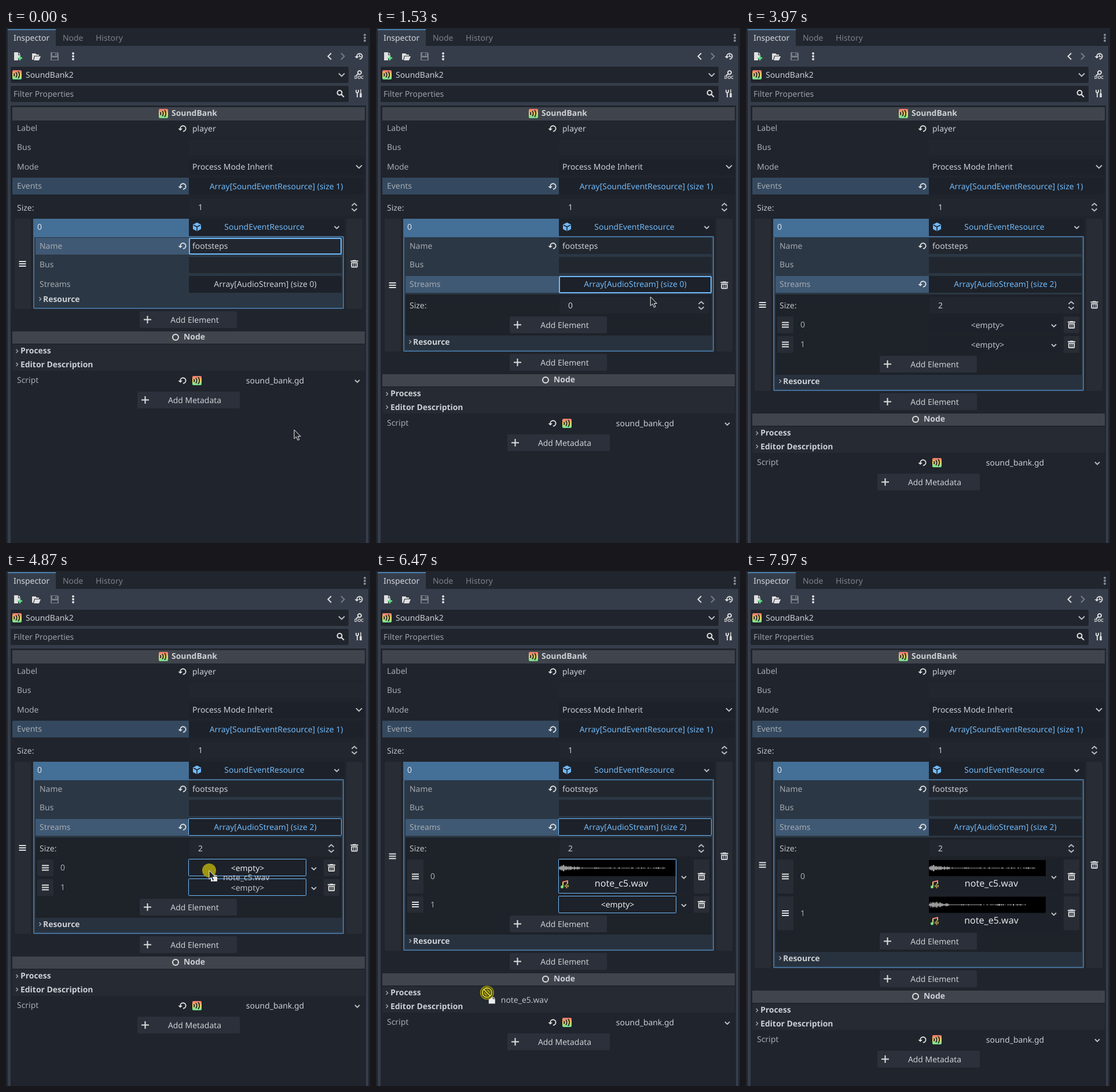
These frames come from a looping animation (629 px wide and 891 px high, 9.02 s). An HTML page:

```html
<!DOCTYPE html>
<html lang="en">
<head>
<meta charset="utf-8">
<title>Inspector</title>
<style>
html, body { margin: 0; width: 100%; height: 100%; overflow: hidden; background: #21262e; }
svg { display: block; width: 629px; height: 891px; font: 13.93px "Noto Sans", sans-serif; }
text { white-space: pre; text-rendering: geometricPrecision; }
</style>
</head>
<body>
<svg viewBox="0 0 629 891">
  <defs>
    <linearGradient id="audio" x1="0" y1="0" x2="0" y2="1">
      <stop offset="0.1" stop-color="#f4806a"/>
      <stop offset="0.5" stop-color="#efd962"/>
      <stop offset="0.9" stop-color="#79e08c"/>
    </linearGradient>
  </defs>
  <g id="frame"></g>
  <g id="body"></g>
  <g id="pointer">
    <g id="ghost">
      <path d="M3 7H10V11H14V19H3Z" fill="#eceded"/>
      <path d="M11 7 14 10H11Z" fill="#eceded"/>
      <text id="file" x="24" y="17" fill="#d8dade" opacity=".85"></text>
    </g>
    <circle id="halo" r="12" fill="#9d9512"/>
    <path id="arrow" d="M0 0V15.5L3.6 12.2 6.2 18.2 8.8 17 6.3 11.4H11Z" fill="#20242b" stroke="#f4f4f4" stroke-linejoin="round"/>
    <g id="deny" fill="none">
      <path d="M-5.5-5.5 5.5 5.5M8 0A8 8 0 1 1 8-.1" stroke="#26260c" stroke-width="4.4"/>
      <path d="M-5.5-5.5 5.5 5.5M8 0A8 8 0 1 1 8-.1" stroke="#dfd62a" stroke-width="2"/>
    </g>
  </g>
</svg>
<script>
const LOOP = 9020;
const BG = '#20242c', FIELD = '#1d2129', EDIT = '#22272f', BASE = '#363d4a', BUTTON = '#2b303a';
const SUB = '#2b3744', PICK = '#3f5873', EDGE = '#446f97', BLUE = '#70bafa';
const LABEL = '#a6abb2', VALUE = '#cdd0d5', WHITE = '#e0e0e0';
const $ = id => document.getElementById(id);

const rect = (x, y, w, h, fill, rx = 0) =>
  `<rect x="${x}" y="${y}" width="${w}" height="${h}" fill="${fill}" rx="${rx}"/>`;
const outline = (x, y, w, h, width, color = BLUE) =>
  `<rect x="${x}" y="${y}" width="${w}" height="${h}" fill="none" stroke="${color}" stroke-width="${width}" rx="1"/>`;
const text = (x, y, s, fill = LABEL, extra = '') =>
  `<text x="${x}" y="${y + 5}" fill="${fill}" ${extra}>${s}</text>`;
const mid = (x, y, s, fill = VALUE, extra = '') => text(x, y, s, fill, 'text-anchor="middle" ' + extra);
const bold = (x, y, s, fill = VALUE) => text(x, y, s, fill, 'font-weight="700"');
const line = (x, y, d, width = 2, color = WHITE) =>
  `<path transform="translate(${x} ${y})" d="${d}" fill="none" stroke="${color}" stroke-width="${width}"/>`;
const shape = (x, y, d, color = WHITE) =>
  `<path transform="translate(${x} ${y})" d="${d}" fill="${color}" fill-rule="evenodd"/>`;
// Icon drawn on a 16-unit grid, centred on x, y.
const glyph = (x, y, d) =>
  `<path transform="translate(${x} ${y}) scale(.94) translate(-8 -8)" d="${d}" fill="${WHITE}" fill-rule="evenodd"/>`;

const RESET = 'M9 2A6 6 0 0 0 3 8H0L4 12 8 8H5A4 4 0 1 1 9 12V14A6 6 0 0 0 9 2Z';
const TRASH = 'M5 1V2H1V4H15V2H11V1ZM2 5V13A2 2 0 0 0 4 15H12A2 2 0 0 0 14 13V5ZM4 7H6V13H4ZM7 7H9V13H7ZM10 7H12V13H10Z';

const chevron = (x, y, s = 4) => line(x, y, `M${-s} ${-s / 2}L0 ${s / 2} ${s} ${-s / 2}`, 1.8, '#c0c3c8');
const arrowRight = (x, y) => line(x, y, 'M-1.5-3 1.5 0-1.5 3', 1.5, '#a0a4aa');
const spinner = (x, y) => line(x, y, 'M-4.5-2.5 0-6.5 4.5-2.5M-4.5 2.5 0 6.5 4.5 2.5', 2, '#b9bcc1');
const plus = (x, y) => line(x, y, 'M-6.5 0H6.5M0-6.5V6.5');
const kebab = (x, y, color) => [-5, 0, 5].map(d => `<circle cx="${x}" cy="${y + d}" r="2" fill="${color}"/>`).join('');
const reset = (x, y) => glyph(x, y, RESET);
const trash = (x, y) => glyph(x, y, TRASH);
const grip = (x, y) => line(x, y, 'M-6-4H6M-6 0H6M-6 4H6', 2);
const bank = (x, y) => rect(x - 8, y - 8, 16, 16, 'url(#audio)', 2) +
  line(x, y, 'M-5.5-2.5Q-3.5 0-5.5 2.5M-2-4.5Q1.5 0-2 4.5M2-6Q6.5 0 2 6', 2, '#2b2b2b');
const cube = (x, y) => shape(x, y, 'M0-7.5 7-4 7 4 0 7.5-7 4-7-4Z', BLUE) +
  line(x, y, 'M-6-3 0 0 6-3M0 0V7', 1.6, BG);
const note = (x, y) => line(x, y, 'M-3 4V-4L5-6V-1', 2, 'url(#audio)') +
  `<circle cx="${x - 4.5}" cy="${y + 4.5}" r="2.5" fill="#7fe07c"/>` +
  line(x, y, 'M1 1V5M3.5-1V7M6 1V5', 1.3, '#e8c85c');

const addButton = (x, y, w, s) => rect(x, y - 14.5, w, 29, BUTTON, 2) + plus(x + 13.5, y) + mid(326, y, s);

function drawFrame() {
  const tools = [
    shape(20, 49, 'M-6-7H1V-2H5V2H1V7H-6ZM2-7 5-3H2Z'),
    line(24, 52, 'M-4 0H4M0-4V4', 2.4, '#62e887'),
    shape(52, 50, 'M-7-6H-1L1-4H5V-2H-3L-5 5H-7ZM-2-1H8L5 6H-4Z'),
    shape(84, 49, 'M-7-7H5L7-5V7H-7ZM-4-6V-1H4V-6ZM-5 2V6H5V2ZM1-5H3V-2H1Z', '#777c85'),
    kebab(116, 49, WHITE),
    line(559, 49, 'M3-5.5-2.5 0 3 5.5'),
    line(582, 49, 'M-3-5.5 2.5 0-3 5.5', 2, '#777c85'),
    glyph(610, 49, RESET), line(610, 49, 'M.8-3V.5H4', 1.7),
    line(611, 77, 'M3 0A3 3 0 1 1 3-.1M-2 2-6 5.5', 2),
    mid(610, 83, 'DOC', WHITE, 'font-size="7.5" font-weight="700"'),
    line(576.5, 112, 'M4 0A4 4 0 1 1 4-.1M3 3 7.5 7.5', 2),
    line(607, 113, 'M-2-6V-3.5Q-2-1 0-1T2-3.5V-6M0-1V7', 1.8),
    line(613, 113, 'M0-7V0', 1.5), line(613, 113, 'M0 0V7', 3.4)
  ];
  const labels = [['Label', 173], ['Bus', 206], ['Mode', 240]];
  $('frame').innerHTML =
    rect(0, 0, 629, 891, '#21262e') + rect(3, 31, 623, 860, BASE) + rect(3, 3, 83, 28, BASE) +
    rect(3, 2, 83, 1.5, '#569bd4') +
    text(13, 17, 'Inspector', '#d6d9de') + text(98, 17, 'Node', '#7d828a') + text(155, 17, 'History', '#7d828a') +
    kebab(620, 17, '#888d95') +
    rect(8, 67, 584, 28, BG, 2) + bank(19, 81) + text(34, 81, 'SoundBank2', VALUE) + chevron(580, 81, 5) +
    rect(8, 100, 584, 28, BG, 2) + text(13, 114, 'Filter Properties', '#9ca0a7') +
    tools.join('') +
    rect(8, 134, 614, 757, BG) +
    rect(11, 137, 609, 23, '#40444c') + bank(272, 148) + bold(286, 147, 'SoundBank') +
    labels.map(([s, y]) => text(19, y, s)).join('') +
    rect(316, 161, 304, 27, EDIT) + reset(305, 174) + text(322, 174, 'player', VALUE) +
    rect(316, 193, 304, 28, EDIT) +
    rect(316, 227, 304, 28, FIELD) + text(322, 240, 'Process Mode Inherit', VALUE) + chevron(610, 240, 5) +
    rect(11, 259, 305, 29, '#34495f') + text(19, 273, 'Events') + reset(305, 274) +
    rect(316, 259, 304, 29, FIELD) + mid(467, 274, 'Array[SoundEventResource] (size 1)', BLUE) +
    text(19, 311, 'Size:', '#bfc3c9') + rect(317, 296, 290, 28, EDIT) + text(332, 310, '1', VALUE) + spinner(602, 310);
}

function wave(x, y, seed, length) {
  let d = '';
  for (let i = 0; i < length; i++) {
    seed = seed * 16807 % 2147483647;
    const r = seed / 2147483647;
    const a = i < 36 ? (2 + 5 * r) * (1 - i / 55) * Math.min(1, .5 + i / 10) : r > .9 ? 1.5 : .5;
    if (i < 90 || r > .25) d += `M${i + .5} ${-a.toFixed(1)}V${a.toFixed(1)}`;
  }
  return rect(x, y, 202, 28, '#000') + line(x, y + 14, d, 1, '#9a9a9a');
}

const FILES = ['note_c5.wav', 'note_e5.wav'];

function slot(i, y, filled, s) {
  const h = filled ? 59 : 29, c = y + h / 2;
  const hot = s.drag && i === s.files;
  return rect(54, y, 28, h, '#272c35', 2) + grip(68, c) + text(94, c - .5, i) +
    rect(316, y, 229, h, FIELD) +
    (filled
      ? wave(316, y + 1, 97 + i * 4211, i ? 168 : 185) + note(326, y + 43) + mid(424, y + 42, FILES[i], '#e4e6e9', 'font-size="16"')
      : mid(417.5, c, '&lt;empty&gt;', hot ? '#eceef0' : '#bec2c8')) +
    chevron(532, c + 1.5) + rect(549, y, 27, h, '#272c35', 2) + trash(562.5, c) +
    (s.drag ? outline(315.5, Math.round(y) - .5, 203, h, 1) : '');
}

function streams(s, extra) {
  let out = rect(51, 461, 529, extra + 1, '#1e2229') + text(58, 480, 'Size:', '#bfc3c9') +
    rect(317, 466, 259, 28, EDIT) + text(332, 480, s.size, VALUE) + spinner(562, 480);
  if (s.focus === 'spin') out += outline(318, 467, 257, 27, 2);
  let y = 499;
  for (let i = 0; i < s.size; i++) {
    const filled = i < s.files;
    out += slot(i, y, filled, s);
    y += filled ? 63.5 : 34;
  }
  return out + addButton(231, 439.5 + extra, 168, 'Add Element');
}

function drawBody(s) {
  const extra = s.open ? Math.round(74 + 33.8 * s.size + 29.6 * s.files) : 0;
  const c = 408 + extra / 2, at = y => y + extra;
  const row = (y, name, on) => (on ? rect(51, y - 14, 265, 29, PICK) : '') + text(58, y, name);
  $('body').innerHTML =
    rect(15, 330, 28, 156 + extra, '#272c35', 2) + grip(28.5, c) +
    rect(588, 330, 28, 156 + extra, '#272c35', 2) + trash(602, c) +
    rect(47, 330, 537, 156 + extra, SUB) + rect(316, 330, 268, 30, FIELD) + rect(47, 330, 269, 30, EDGE) +
    text(54, 344, '0', '#e2e5e9') + cube(330, 344) + mid(446.5, 344, 'SoundEventResource', BLUE) + chevron(571.5, 345) +
    outline(48, 361, 535, 124 + extra, 2, EDGE) +
    row(377, 'Name', s.focus === 'name') + reset(305, 377) +
    rect(316, 363, 264, 28, EDIT) + text(322, 377, 'footsteps', VALUE) +
    row(409, 'Bus') + rect(316, 396, 264, 28, EDIT) +
    row(443, 'Streams', s.open) + (s.size ? reset(305, 443) : '') +
    rect(316, 429, 264, 29, FIELD) +
    mid(448, 443, `Array[AudioStream] (size ${s.size})`, s.open ? BLUE : s.hover ? '#eef0f2' : VALUE) +
    (s.focus === 'name' ? outline(317, 364, 262, 27, 2) : '') +
    (s.focus === 'streams' ? outline(317, 430, 262, 28, 2) : '') +
    (s.drag ? outline(315.5, 428.5, 264, 29, 1) : '') +
    (s.open ? streams(s, extra) : '') +
    rect(51, at(458), 529, 24, s.open ? '#28323e' : SUB) + arrowRight(59, at(469)) + bold(64, at(469), 'Resource') +
    addButton(231, at(504.5), 168, 'Add Element') +
    rect(11, at(525), 609, 21, '#40444c') +
    `<circle cx="293" cy="${at(535)}" r="5" fill="none" stroke="${WHITE}" stroke-width="2"/>` +
    bold(307, at(534), 'Node') +
    rect(11, at(548), 609, 45, '#252a33') +
    arrowRight(19, at(559)) + bold(25, at(558), 'Process') +
    arrowRight(19, at(582)) + bold(25, at(581.5), 'Editor Description') +
    text(19, at(609), 'Script') + reset(305, at(610)) + bank(330, at(610)) +
    mid(465, at(610), 'sound_bank.gd') + chevron(607, at(611)) +
    addButton(227, at(643.5), 177, 'Add Metadata');
}

// Pointer tracks: [time, x, y]; the pointer is hidden between tracks.
const TRACKS = [
  [[0, 498, 695], [270, 498, 695], [500, 482, 560], [740, 450, 445], [1420, 450, 445], [1530, 474, 465],
   [1740, 535, 476], [1960, 562, 477], [2720, 562, 477], [2860, 360, 560], [3020, -20, 740]],
  [[4270, -14, 774], [4400, 130, 708], [4600, 285, 592], [4870, 351, 518], [5180, 351, 518], [5350, -20, 690]],
  [[6360, 57, 780], [6470, 191, 730], [6650, 305, 645], [6910, 356, 579], [7130, 356, 579],
   [7500, 390, 690], [7970, 440, 895]]
];

function slope(p, i, k) {
  const a = p[i - 1], b = p[i], c = p[i + 1];
  if (!a || !c) return 0;
  const l = (b[k] - a[k]) / (b[0] - a[0]), r = (c[k] - b[k]) / (c[0] - b[0]);
  return l * r > 0 ? 2 * l * r / (l + r) : 0;
}

function position(t) {
  const p = TRACKS.find(q => t >= q[0][0] && t < q[q.length - 1][0]);
  if (!p) return null;
  const i = p.findIndex((q, n) => t < p[n + 1][0]), a = p[i], b = p[i + 1];
  const d = b[0] - a[0], u = (t - a[0]) / d, v = 1 - u;
  return [1, 2].map(k =>
    a[k] * v * v * (1 + 2 * u) + b[k] * u * u * (3 - 2 * u) +
    d * u * v * (v * slope(p, i, k) - u * slope(p, i + 1, k)));
}

const within = (t, ...spans) => spans.some(([a, b]) => t >= a && t < b);
const show = (id, on) => $(id).setAttribute('display', on ? 'inline' : 'none');

function stateAt(t) {
  return {
    open: t >= 1210,
    size: t < 2270 ? 0 : t < 2640 ? 1 : 2,
    files: t < 5140 ? 0 : t < 7110 ? 1 : 2,
    focus: t < 1150 ? 'name' : t < 2270 ? 'streams' : t < 3970 ? 'spin' : '',
    hover: within(t, [710, 1210]),
    drag: within(t, [4030, 5140], [6160, 7110])
  };
}

let last = '';
function render(t) {
  const s = stateAt(t), key = JSON.stringify(s);
  if (key !== last) {
    drawBody(s);
    last = key;
  }
  const p = position(t);
  show('pointer', p);
  if (!p) return;
  const [x, y] = p;
  const droppable = x > 316 && x < 518 && y > 499 && y < (s.files ? 591 : 561);
  const denied = s.drag && !droppable;
  $('pointer').setAttribute('transform', `translate(${x.toFixed(1)} ${y.toFixed(1)})`);
  show('halo', s.drag || within(t, [1150, 1210], [2270, 2340], [2640, 2700]));
  show('arrow', !denied);
  show('deny', denied);
  show('ghost', s.drag);
  $('file').textContent = FILES[Math.min(s.files, 1)];
}

drawFrame();
const start = performance.now();
function tick() {
  render((performance.now() - start) % LOOP);
  requestAnimationFrame(tick);
}
tick();
</script>
</body>
</html>
```
